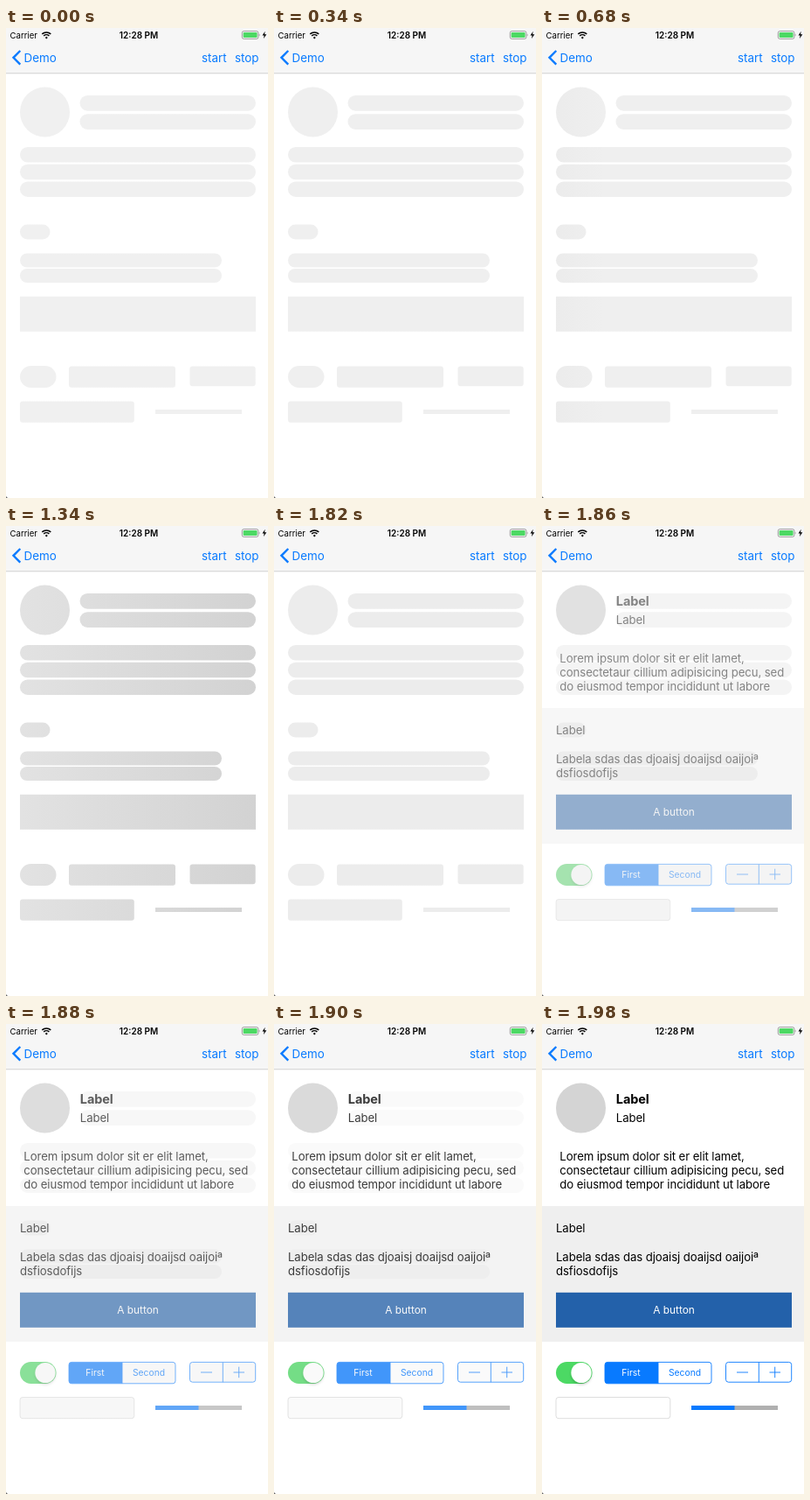
An HTML page that plays this animation: 300 px wide and 537 px high, repeating every 2.98 s.

```html
<!DOCTYPE html>
<html lang="en">
<head>
<meta charset="utf-8">
<title>Skeleton loading</title>
<style>
  html, body { margin: 0; width: 100%; height: 100%; overflow: hidden; background: #fff; }
  svg { display: block; width: 100%; height: 100%; }
  text { font-family: Inter, "Liberation Sans", sans-serif; font-size: 13.2px; letter-spacing: -.09px; }
  .nav { fill: #087aff; }
  .bar { font-size: 13.4px; letter-spacing: 0; }
  .status { font-size: 9.6px; letter-spacing: 0; }
  .small { font-size: 10.3px; letter-spacing: 0; text-anchor: middle; }
  .line { fill: none; stroke: #087aff; stroke-width: .9; }
</style>
</head>
<body>
<svg viewBox="0 0 300 537">
  <defs>
    <linearGradient id="shimmer" gradientUnits="userSpaceOnUse" y1="0" y2="0">
      <stop class="base"/>
      <stop offset=".5" stop-color="#d2d2d2"/>
      <stop class="base" offset="1"/>
    </linearGradient>
    <clipPath id="segments"><rect x="72" y="386.4" width="122" height="24.4" rx="3"/></clipPath>
    <filter id="shadow" x="-30%" y="-30%" width="160%" height="170%">
      <feDropShadow dx="0" dy="1.8" stdDeviation="1.8" flood-opacity=".22"/>
    </filter>
  </defs>

  <rect width="300" height="537" fill="#fff"/>
  <rect width="300" height="51.5" fill="#f6f6f6"/>
  <path d="M0 51.8H300" stroke="#bdbdbd" stroke-width=".7"/>
  <path d="M0 535v2h2z" fill="#666"/>

  <text class="status" x="4.5" y="11.7">Carrier</text>
  <path d="M41.3 6.9a7.2 7.2 0 0 1 10 0M43.2 9a4.5 4.5 0 0 1 6.2 0" fill="none" stroke="#000" stroke-width="1.5"/>
  <path d="M46.3 9.8l-1.5 1.1 1.5 1.6 1.5-1.6z"/>
  <text class="status" x="152" y="11.7" font-weight="600" text-anchor="middle" style="font-size:10px">12:28 PM</text>
  <rect x="270.3" y="3.6" width="18.6" height="8.8" rx="2" fill="none" stroke="#777" stroke-width=".7"/>
  <rect x="271.6" y="4.9" width="16" height="6.2" rx="1" fill="#4cd964"/>
  <path d="M289.8 6.6q1.5 1.4 0 2.8z" fill="#777"/>
  <path d="M296.7 3.7l-3.2 4.8h2.2l-.9 3.8 3.5-5.1h-2.3z"/>

  <path d="M16.3 26l-7.8 7.8 7.8 7.8" fill="none" stroke="#087aff" stroke-width="2.4"/>
  <text class="nav bar" x="20.5" y="38.7">Demo</text>
  <text class="nav bar" x="224" y="38.7">start</text>
  <text class="nav bar" x="262" y="38.7">stop</text>

  <g id="skeleton"></g>

  <g id="content" opacity="0">
    <rect y="53" width="300" height="420" fill="#fff"/>
    <rect y="208" width="300" height="155" fill="#efefef"/>
    <circle class="bone" cx="44.5" cy="96" r="28.5" fill="#d4d4d4"/>
    <text x="84.8" y="91" font-weight="700" style="font-size:14.5px">Label</text>
    <text x="84.8" y="112">Label</text>
    <text x="20.3" y="156">Lorem ipsum dolor sit er elit lamet,</text>
    <text x="20.3" y="172.2">consectetaur cillium adipisicing pecu, sed</text>
    <text x="20.3" y="188.4">do eiusmod tempor incididunt ut labore</text>
    <text x="16" y="238">Label</text>
    <text x="16" y="270.7">Labela sdas das djoaisj doaijsd oaijoiª</text>
    <text x="16" y="286.9">dsfiosdofijs</text>

    <rect class="bone" x="16" y="306.8" width="270" height="40" fill="#2361aa"/>
    <text x="151" y="331.2" fill="#fff" text-anchor="middle" style="font-size:11.9px;letter-spacing:0">A button</text>

    <rect class="bone" x="16" y="386" width="41.5" height="25" rx="12.5" fill="#4cd964"/>
    <circle cx="45" cy="398.5" r="11.6" fill="#fff" filter="url(#shadow)"/>

    <rect x="72" y="386" width="61" height="25" fill="#087aff" clip-path="url(#segments)"/>
    <rect class="bone line" x="72" y="386.4" width="122" height="24.4" rx="3"/>
    <path class="line" d="M133 386.5V411"/>
    <text class="small" x="102" y="402.3" fill="#fff">First</text>
    <text class="small nav" x="163.5" y="402.3">Second</text>

    <rect class="bone line" x="210.5" y="386.4" width="75.2" height="22.8" rx="3"/>
    <path class="line" d="M248.3 386.5V409.3M223 398H236M260.5 398H273M266.7 391.7V404.2"/>

    <rect class="bone" x="16" y="426.5" width="130.8" height="24.2" rx="3" fill="#fff" stroke="#d5d5d5" stroke-width=".8"/>
    <rect class="bone" x="171" y="436" width="99" height="5" fill="#b0b0b0"/>
    <rect x="171" y="436" width="49.5" height="5" fill="#087aff"/>
  </g>
</svg>

<script>
const LOOP = 2980, FRAME = 20;
const FADE_START = 1820, FADE_TIME = 160;
const BAND_START = -1090, BAND_SPEED = 1.03, HALF_BAND = 460;

const $ = selector => document.querySelector(selector);
const skeleton = $('#skeleton'), content = $('#content'), shimmer = $('#shimmer');
const baseStops = document.querySelectorAll('.base');

const setAttributes = (element, attributes) => {
  for (const name in attributes) element.setAttribute(name, attributes[name]);
  return element;
};

function addBone(shape) {
  shape.removeAttribute('class');
  skeleton.append(setAttributes(shape, { fill: 'url(#shimmer)', stroke: 'none' }));
}

// One pill per line of text
function addLines(x, y, width, height, count = 1, pitch = 0) {
  for (let i = 0; i < count; i++) {
    const pill = document.createElementNS(skeleton.namespaceURI, 'rect');
    addBone(setAttributes(pill, { x, y: y + i * pitch, width, height, rx: height / 2 }));
  }
}

addLines(84.5, 77, 201.5, 17.7, 2, 21.2);
addLines(16, 136, 270, 17.5, 3, 19.7);
addLines(16, 224.5, 34.5, 17);
addLines(16, 257.5, 231, 16, 2, 17.5);
document.querySelectorAll('.bone').forEach(bone => addBone(bone.cloneNode()));

const clamp = value => Math.min(Math.max(value, 0), 1);
const easeOut = p => 1 - (1 - p) ** 2;

function draw(t) {
  const centre = BAND_START + t * BAND_SPEED;
  setAttributes(shimmer, { x1: centre - HALF_BAND, x2: centre + HALF_BAND });
  const grey = 240 - 4 * clamp(t / FADE_START);
  baseStops.forEach(stop => setAttributes(stop, { 'stop-color': `rgb(${grey},${grey},${grey})` }));
  content.setAttribute('opacity', easeOut(clamp((t - FADE_START) / FADE_TIME)));
}

const start = performance.now();
function tick() {
  const t = (performance.now() - start) % LOOP;
  draw(Math.floor(t / FRAME) * FRAME);
  requestAnimationFrame(tick);
}
tick();
</script>
</body>
</html>
```
